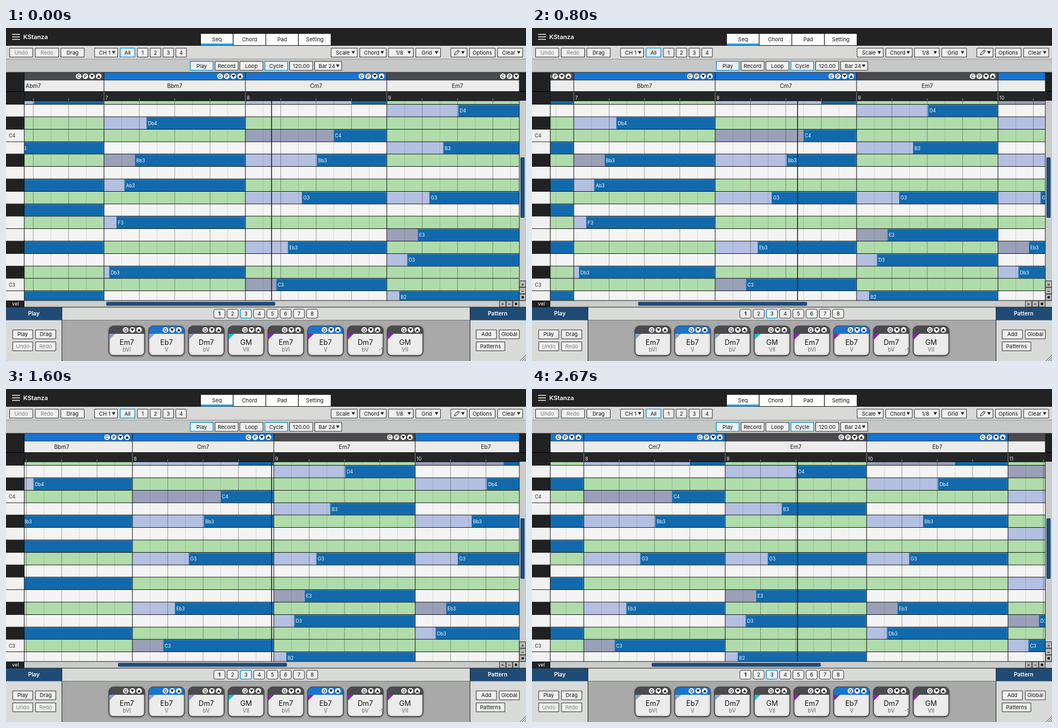
Recreate the animation shown at these times as an HTML page with a canvas. Size 934x600 px, loop 2740 ms.

```html
<!DOCTYPE html>
<html lang="en">
<head>
<meta charset="utf-8">
<title>KStanza</title>
<style>
  html, body { margin: 0; width: 100%; height: 100%; overflow: hidden; background: #222; }
  canvas { display: block; }
</style>
</head>
<body>
<canvas id="stage" width="934" height="600"></canvas>
<script>
const ctx = document.getElementById('stage').getContext('2d');
const LOOP = 2740, STEP = 200 / 3;
const BAR = 254, ROW = 22.4, ROW_TOP = 137.6, LEFT = 33, RIGHT = 922;
const INK = '#1f2123', NAVY = '#204b75', BLUE = '#1874d2', GREY = '#4b4b4f', ACCENT = '#2a9fd8';
const PITCHES = 'D Db C B Bb A Ab G Gb F E Eb'.split(' ');
const IN_SCALE = new Set('Ab Bb C Db Eb F G'.split(' '));
const STRUM = [9, 22, 36.5, 55, 76, 101, 128, 158, 190];   // note delays inside a bar
const SCROLL = [[0, 0], [8, 67], [16, 134.5], [24, 203], [30, 254], [36, 304.5], [40, 337]];

// rows run bottom up; first is the index of the lowest note's delay
const bars = [
  { name: 'Abm7', color: GREY, first: 1, rows: [15, 11, 8, 6, 3, -1] },
  { name: 'Bbm7', color: BLUE, first: 0, rows: [13, 9, 6, 4, 1] },
  { name: 'Cm7', color: BLUE, first: 3, rows: [14, 11, 7, 4, 2, -1] },
  { name: 'Em7', color: GREY, first: 1, rows: [15, 12, 10, 7, 3, 0] },
  { name: 'Eb7', color: BLUE, first: 2, rows: [13, 11, 7, 4, 1, -1] },
  { name: 'Dm7', color: GREY, first: 2, rows: [14, 12, 9, 5, 2, 0] },
];
const pads = [
  ['Em7', 'bVI', '#86a0d6'], ['Eb7', 'V', '#86a0d6'], ['Dm7', 'bV', '#86a0d6'], ['GM', 'VII', '#00c3dc'],
  ['Em7', 'bVI', '#8a22b4'], ['Eb7', 'V', '#8a22b4'], ['Dm7', 'bV', '#8a22b4', '-1'], ['GM', 'VII', '#8a22b4'],
];

const pitch = row => PITCHES[(row + 12) % 12];
const octave = row => 4 - Math.ceil((row - 2) / 12);
const rowY = row => Math.round((ROW_TOP + row * ROW) * 2) / 2;

function box(x1, y1, x2, y2, fill) {
  ctx.fillStyle = fill;
  ctx.fillRect(x1, y1, x2 - x1, y2 - y1);
}

function text(str, x, y, size = 9.5, color = '#111', align = 'center', weight = 400) {
  ctx.font = `${weight} ${size}px Inter, sans-serif`;
  ctx.textAlign = align;
  ctx.fillStyle = color;
  ctx.fillText(str, x, y + size * 0.36);
}

function frame(x1, y1, x2, y2, radius, fill, stroke, width = 1) {
  ctx.beginPath();
  ctx.roundRect(x1, y1, x2 - x1, y2 - y1, radius);
  ctx.fillStyle = fill;
  ctx.fill();
  ctx.strokeStyle = stroke;
  ctx.lineWidth = width;
  ctx.stroke();
}

function poly(points, fill) {
  ctx.beginPath();
  points.forEach(([x, y]) => ctx.lineTo(x, y));
  ctx.closePath();
  ctx.fillStyle = fill;
  ctx.fill();
}

function triangle(x, y, r, dir) {
  poly([[x - r, y - r * 0.85 * dir], [x + r, y - r * 0.85 * dir], [x, y + r * 0.85 * dir]], '#111');
}

function disc(x, y, r, fill) {
  ctx.beginPath();
  ctx.arc(x, y, r, 0, 7);
  ctx.fillStyle = fill;
  ctx.fill();
}

function icons(glyphs, x, y) {
  [...glyphs].forEach((g, i) => {
    const cx = x + i * 12;
    disc(cx, y, 5, '#fff');
    if (g === 'v' || g === '^') triangle(cx, y, 3, g === 'v' ? 1 : -1);
    else text(g, cx, y, 8, '#111', 'center', 500);
  });
}

// style: '' plain, 'off' dimmed, 'on' highlighted, 'menu' with arrow
function button(label, x1, x2, y, style = '', radius = 0) {
  const on = style === 'on', menu = style === 'menu';
  frame(x1, y, x2, y + 16, radius, '#f0f0f0', on ? ACCENT : '#333', on ? 1.6 : 1);
  text(label, (x1 + x2) / 2 - (menu ? 2.5 : 0), y + 8, 9.5, style === 'off' ? '#808080' : '#111');
  if (menu) triangle(x2 - 7.2, y + 8, 3, 1);
}

function scrollButton(sign, x, y) {
  frame(x, y, x + 11.5, y + 11.5, 0, '#b4b5b4', '#333');
  if (sign === 'o') disc(x + 5.8, y + 5.8, 2.3, '#111');
  else text(sign, x + 5.8, y + 5.8, 9);
}

function drawToolbars() {
  box(0, 0, 934, 32, '#222');
  [11.5, 16, 20.5].forEach(y => box(11, y - 0.7, 25, y + 0.7, '#fff'));
  text('KStanza', 31, 16, 11, '#fff', 'left', 600);
  ['Seq', 'Chord', 'Pad', 'Setting'].forEach((name, i) => {
    const x = 349.5 + i * 58.6;
    frame(x, 10, x + 58.6, 31.5, 0, '#fff', '#111');
    if (!i) box(x + 0.5, 28, x + 58, 31.5, ACCENT);
    text(name, x + 29.3, 21);
  });

  box(0, 32, 934, 56, '#d9dad8');
  box(0, 56, 934, 80, '#c5c8c6');
  box(0, 55.5, 934, 56.3, '#888');
  [['Undo', 6.5, 48, 'off'], ['Redo', 52.5, 94.5, 'off'], ['Drag', 98.5, 140.5], ['CH 1', 159, 200.5, 'menu'],
   ['All', 205, 231.5, 'on'], ['1', 236, 255], ['2', 259, 278], ['3', 282, 301], ['4', 305, 324],
   ['Scale', 584, 631, 'menu'], ['Chord', 635.5, 683, 'menu'], ['1/8', 687, 731.5, 'menu'],
   ['Grid', 736, 780.5, 'menu'], ['', 799, 828, 'menu'], ['Options', 832.5, 878.5], ['Clear', 883, 928, 'menu'],
  ].forEach(([name, x1, x2, style]) => button(name, x1, x2, 36.3, style));
  [['Play', 331, 372, 'on'], ['Record', 375.5, 417], ['Loop', 420, 461.5], ['Cycle', 465, 506, 'on'],
   ['120.00', 509.5, 551], ['Bar 24', 554.5, 603, 'menu'],
  ].forEach(([name, x1, x2, style]) => button(name, x1, x2, 60.2, style));

  ctx.strokeStyle = '#111';
  ctx.stroke(new Path2D('M805.5 48.5l.8-3.2 5.6-5.6 2.4 2.4-5.6 5.6zM810.4 41.2l2.4 2.4'));
}

function drawNote(x, row, delay, root) {
  const y = rowY(row), bottom = rowY(row + 1), start = x + delay;
  box(start, y, x + BAR, bottom, '#126aac');
  ctx.strokeStyle = '#5596c8';
  ctx.lineWidth = 1;
  ctx.strokeRect(start + 0.5, y + 1, BAR - delay - 1.5, bottom - y - 1);
  text(pitch(row) + octave(row), start + 3, y + 11.7, 8.3, '#fff', 'left');
}

function drawBar(bar, number, x) {
  box(x, 80, x + BAR, 94, bar.color);
  box(x, 94, x + BAR, 114.5, '#ececec');
  box(x, 93.5, x + BAR, 94.3, '#222');
  icons('CPv^', x + BAR - 45.5, 87);
  text(bar.name, x + BAR / 2, 104.5, 10);
  box(x, 114.5, x + BAR, 131, '#242628');
  text(number, x + 2.5, 125.5, 8.5, '#eee', 'left');

  ctx.save();
  ctx.beginPath();
  ctx.rect(LEFT, 131, RIGHT - LEFT, 360);
  ctx.clip();
  for (let row = -1; row < 16; row++)
    box(x, rowY(row), x + BAR, rowY(row + 1), IN_SCALE.has(pitch(row)) ? '#b0dcab' : '#f4f4f4');
  bar.rows.forEach((row, i) => {
    const slot = bar.first + i;
    box(x, rowY(row), x + STRUM[slot], rowY(row + 1), slot % 4 === 3 ? '#9aa0b8' : '#b4c0e1');
  });
  for (let i = 1; i < 8; i++) {
    const gx = x + i * BAR / 8;
    box(gx - 0.5, 131, gx + 0.5, 491, i % 2 ? 'rgba(0,0,0,.13)' : 'rgba(0,0,0,.36)');
  }
  bar.rows.forEach((row, i) => drawNote(x, row, STRUM[bar.first + i]));
  ctx.restore();

  for (let i = 1; i < 4; i++) box(x + i * BAR / 4 - 0.5, 127, x + i * BAR / 4 + 0.5, 131, '#999');
}

function drawRoll(offset) {
  ctx.save();
  ctx.beginPath();
  ctx.rect(LEFT, 80, RIGHT - LEFT, 411);
  ctx.clip();
  const barX = i => 176 + (i - 1) * BAR - offset;
  bars.forEach((bar, i) => drawBar(bar, i + 6, barX(i)));
  for (let row = 0; row < 16; row++) box(LEFT, rowY(row) - 0.5, RIGHT, rowY(row) + 0.5, '#161a1c');
  box(LEFT, 114, RIGHT, 115, '#111');
  box(LEFT, 130.7, RIGHT, 131.7, '#111');
  bars.forEach((bar, i) => {
    box(barX(i) - 0.5, 80, barX(i) + 0.5, 491, '#111');
    box(barX(i) - 0.5, 115, barX(i) + 0.5, 131, '#999');
  });
  box(476.3, 131, 477.7, 491, '#111');
  ctx.restore();
}

function drawKeys() {
  box(0, 80, LEFT, 131, INK);
  box(0, 114, LEFT, 115, '#000');
  for (let row = -1; row < 16; row++) {
    const y = Math.max(131, rowY(row)), name = pitch(row);
    box(0, y, LEFT, Math.min(491, rowY(row + 1)), name.endsWith('b') ? INK : '#f1f1f1');
    box(0, y - 0.5, LEFT, y + 0.5, '#222');
    if (name === 'C') text('C' + octave(row), 5, y + 11.5, 8.5, '#222', 'left');
  }
  box(LEFT - 0.7, 80, LEFT + 0.3, 491, '#111');
}

function drawScrollbars(offset) {
  box(RIGHT, 80, 934, 131, INK);
  box(RIGHT, 114, 934, 115, '#000');
  box(RIGHT, 131, 934, 503, '#cbcdcb');
  box(RIGHT - 0.5, 80, RIGHT + 0.5, 491, '#222');
  frame(924.5, 233.5, 931, 341.5, 1, NAVY, NAVY);
  box(0, 491, RIGHT, 503, '#cbcdcb');
  box(0, 491, LEFT, 503, INK);
  text('vel', 17, 497, 9, '#fff');
  box(LEFT, 490.5, 934, 491.5, '#222');
  const x = 180 + offset * 0.104;
  frame(x + 0.5, 493.9, x + 303, 500, 1, NAVY, NAVY);
  ['+', '−', 'o'].forEach((sign, i) => {
    scrollButton(sign, 886.3 + i * 12, 491.3);
    scrollButton(sign, 922.2, 455.5 + i * 12);
  });
}

function drawPad([name, degree, color, shift], i) {
  const cx = 217 + i * 71.4, x = cx - 32, blue = i % 4 === 1;
  ctx.save();
  ctx.shadowColor = 'rgba(0,0,0,.5)';
  ctx.shadowBlur = 3;
  ctx.shadowOffsetY = 1;
  frame(x, 537, x + 64, 590, 8, '#ececec', '#444');
  ctx.restore();
  ctx.save();
  ctx.clip();
  box(x, 537, x + 64, 551, blue ? BLUE : GREY);
  poly([[x, 551], [x + 11, 551], [x, 562]], color);
  ctx.restore();
  frame(x, 537, x + 64, 590, 8, 'transparent', '#444');
  icons('Qv^', cx - 2, 544);
  text(name, cx, 566, 12.7);
  text(degree, cx, 580, 9.7, '#666');
  if (shift) text(shift, cx + 27.5, 580, 8.5, '#555');
}

function drawFooter() {
  box(0, 503, 934, 600, '#d9dbd9');
  box(101, 526.5, 833, 600, '#a8a9a8');
  box(101, 526, 833, 527, '#777');
  [[0, 100, 'Play'], [834, 934, 'Pattern']].forEach(([x1, x2, name]) => {
    box(x1, 503, x2, 526.5, NAVY);
    text(name, (x1 + x2) / 2 - (x1 ? 1 : 0), 514.7, 10, '#fff', 'center', 600);
  });
  box(100, 503, 101, 600, '#222');
  box(833, 503, 834, 600, '#222');
  box(0, 502.5, 934, 503.5, '#222');
  for (let i = 0; i < 8; i++) {
    const cx = 383.3 + i * 23.8;
    button('', cx - 10, cx + 10, 506.8, i === 2 ? 'on' : '', 3);
    text(i + 1, cx, 514.8, 9.5, '#111', 'center', i ? 400 : 700);
  }
  [['Play', 12, 48, 0], ['Drag', 53, 89.5, 0], ['Undo', 12, 48, 1, 'off'], ['Redo', 53, 89.5, 1, 'off'],
   ['Add', 844.5, 881, 0], ['Global', 886, 922, 0], ['Patterns', 844.5, 896, 1],
  ].forEach(([name, x1, x2, line, style]) => button(name, x1, x2, 544 + line * 21.6, style));
  pads.forEach(drawPad);
  ctx.strokeStyle = '#555';
  ctx.lineWidth = 1;
  ctx.stroke(new Path2D('M923 600L934 589M927 600L934 593M931 600L934 597'));
}

function scrollAt(step) {
  const i = Math.max(1, SCROLL.findIndex(([s]) => s >= step));
  const [s0, v0] = SCROLL[i - 1], [s1, v1] = SCROLL[i];
  return Math.round((v0 + (v1 - v0) * (step - s0) / (s1 - s0)) * 2) / 2;
}

let begin;
function draw(now) {
  begin ??= now;
  const time = Math.floor((now - begin) % LOOP / 10) * 10;
  const offset = scrollAt(Math.min(40, Math.floor((time + 3.4) / STEP)));
  drawToolbars();
  drawRoll(offset);
  drawKeys();
  drawScrollbars(offset);
  drawFooter();
  box(0, 79.5, 934, 80.5, '#222');
  requestAnimationFrame(draw);
}
requestAnimationFrame(draw);
</script>
</body>
</html>
```
